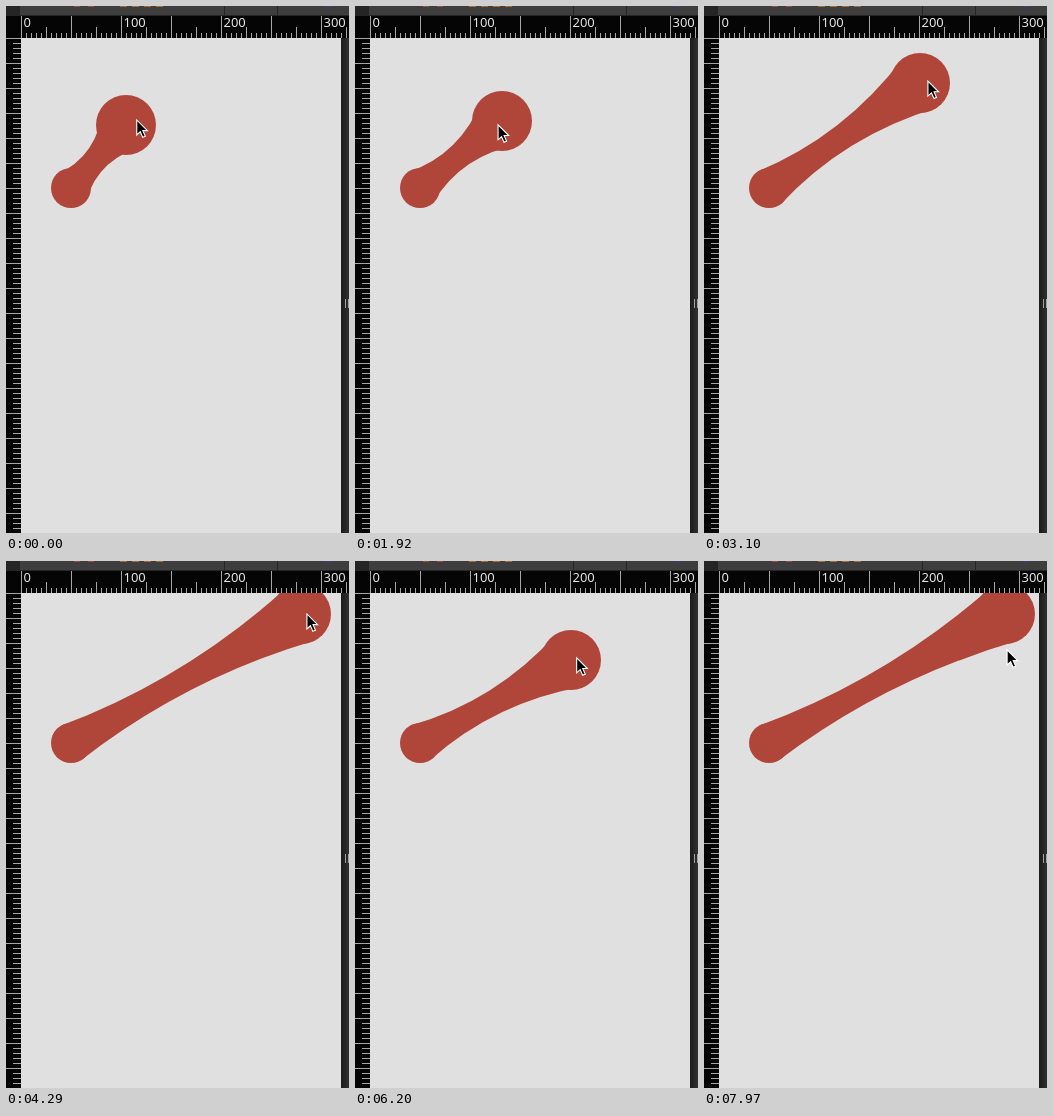
Write an HTML page that moves like this. It is 343 by 527 pixels and loops after 8000 ms.

```html
<!DOCTYPE html>
<html lang="en">
<head>
<meta charset="utf-8">
<title>Elastic blob</title>
<style>
  html, body { margin: 0; width: 100%; height: 100%; overflow: hidden; background: #e0e0e0; }
  svg { display: block; width: 343px; height: 527px; }
  text { font: 500 13px "Noto Sans", "Open Sans", sans-serif; fill: #e4e4e4; }
  .blob { fill: #b0463a; }
  .ticks { stroke: #a6a6a6; shape-rendering: crispEdges; }
</style>
</head>
<body>
<svg viewBox="0 0 343 527">
  <defs>
    <clipPath id="view"><rect x="15" y="32" width="320" height="495"/></clipPath>
    <linearGradient id="edge"><stop stop-color="#1b1b1b"/><stop offset="1" stop-color="#303030"/></linearGradient>
  </defs>
  <rect width="343" height="527" fill="#e0e0e0"/>
  <g class="blob" clip-path="url(#view)">
    <path id="neck"/>
    <circle cx="65" cy="182" r="20"/>
    <circle id="ball" r="30"/>
  </g>
  <rect x="335" y="32" width="8" height="495" fill="url(#edge)"/>
  <path d="M339.5 293v9M342.5 293v9" stroke="#a0a0a0"/>
  <path d="M0 10H343V32H15V527H0z" fill="#050505"/>
  <path id="ticks" class="ticks"/>
  <g id="labels"></g>
  <rect width="343" height="10" fill="#252525"/>
  <rect x="14" width="329" height="9" fill="#3e3e3e"/>
  <path d="M218.5 0V9M271.5 0V9" stroke="#262626"/>
  <path d="M68 .5h20" stroke="#a0453a" stroke-dasharray="6 8"/>
  <path d="M114 .5h44" stroke="#a8692f" stroke-dasharray="7 5"/>
  <path d="M319 .5h7" stroke="#3c3c86"/>
  <path id="cursor" d="M.6 .6V15.6L4.1 12.4 6.6 18 9.2 16.9 6.7 11.3H11.3z" fill="#000" stroke="#fff" stroke-width="1.1"/>
</svg>
<script>
const $ = id => document.getElementById(id);
const LOOP = 8000, STEP = 147.6;
const LAG = .64; // steps by which the ball trails the pointer
const anchor = { x: 65, y: 182, r: 20 };

// Key points of the drag: step, x, y
const drag = [
  [0, 120, 119], [7, 181, 85], [13, 147, 115], [16, 131, 126],
  [21, 216, 77], [29, 295, 53], [31, 309, 51], [35, 250, 80],
  [39, 202, 107], [42, 216, 99], [49, 301, 53]
];
const END = drag.length - 1;

const slope = (i, k) => (drag[i + 1][k] - drag[i][k]) / (drag[i + 1][0] - drag[i][0]);

function tangent(i, k) {
  if (i === 0) return 2 * slope(0, k);
  if (i === END) return 0;
  const a = slope(i - 1, k), b = slope(i, k);
  return a * b > 0 ? 2 * a * b / (a + b) : 0;
}

// Monotone cubic interpolation, so the drag never overshoots its turns
function dragAt(step) {
  const s = Math.min(step, drag[END][0]);
  const i = Math.min(drag.findLastIndex(key => key[0] <= s), END - 1);
  const p = drag[i], q = drag[i + 1], span = q[0] - p[0], u = (s - p[0]) / span;
  const axis = k =>
    p[k] + (q[k] - p[k]) * u * u * (3 - 2 * u) +
    span * u * (1 - u) * (tangent(i, k) * (1 - u) - tangent(i + 1, k) * u);
  return { x: axis(1), y: axis(2) };
}

// After the release the pointer jumps away, rests, and glides back up
function cursorAt(step) {
  if (step < 51) return dragAt(step + LAG);
  const u = Math.max(0, (step - 52) / 2);
  return { x: 247 + 56 * u, y: 224 - 136 * u };
}

function neckPath(a, b) {
  const dx = b.x - a.x, dy = b.y - a.y, d = Math.hypot(dx, dy);
  const rim = (c, side) => `${c.x - side * c.r * dy / d} ${c.y + side * c.r * dx / d}`;
  const mid = `${(a.x + b.x) / 2} ${(a.y + b.y) / 2}`;
  return `M${rim(a, -1)}Q${mid} ${rim(b, -1)}L${rim(b, 1)}Q${mid} ${rim(a, 1)}z`;
}

function drawRulers() {
  let d = "", labels = "";
  for (let v = 0; v <= 325; v += 5) {
    const top = v % 50 === 0 ? 10 : v % 25 === 0 ? 21 : 27;
    d += `M${v + 15.5} ${top}V32`;
    if (v % 100 === 0) labels += `<text x="${v + 17.5}" y="21">${v}</text>`;
  }
  for (let v = 0; v < 495; v += 5) d += `M${v % 25 ? 7 : 0} ${v + 32.5}H15`;
  $("ticks").setAttribute("d", d);
  $("labels").innerHTML = labels;
}

function render(time) {
  const step = Math.floor((time + 8) / STEP);
  const ball = { ...dragAt(step), r: 30 };
  const tip = cursorAt(step);
  $("ball").setAttribute("cx", ball.x);
  $("ball").setAttribute("cy", ball.y);
  $("neck").setAttribute("d", neckPath(anchor, ball));
  $("cursor").setAttribute("transform", `translate(${tip.x - .5} ${tip.y + .3})`);
}

drawRulers();
render(0);
const start = performance.now();
(function tick() {
  render((performance.now() - start) % LOOP);
  requestAnimationFrame(tick);
})();
</script>
</body>
</html>
```
